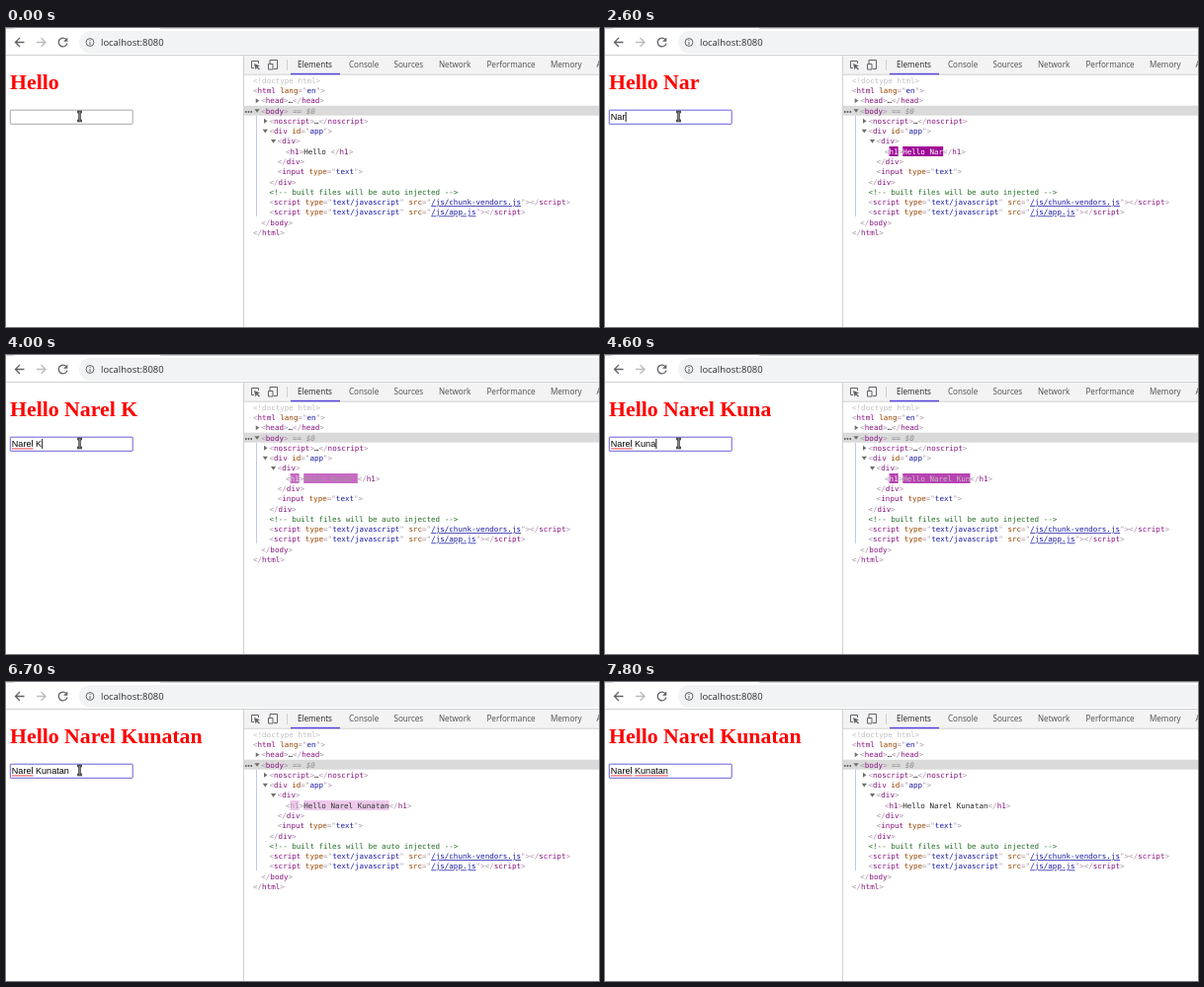
Write an HTML page that moves like this. It is 600 px wide and 303 px high and loops after 8 s.

```html
<!DOCTYPE html>
<html lang="en">
<head>
<meta charset="utf-8">
<title>Live heading</title>
<style>
html, body { margin: 0; width: 100%; height: 100%; overflow: hidden; background: #fff; }
svg { display: block; }
text { white-space: pre; }
.ui { font-family: "Open Sans", "Noto Sans", sans-serif; font-size: 8.1px; fill: #4a4d51; }
.code { font-family: "DejaVu Sans Mono", monospace; font-size: 7.56px; fill: #222; }
.p { fill: #a894a6; }
.t { fill: #881280; }
.a { fill: #994500; }
.v { fill: #1a1aa6; }
.u { text-decoration: underline; }
.c { fill: #236e25; }
.d { fill: #c0c0c0; }
.s { fill: #8a8a8a; font-style: italic; }
.line { fill: none; stroke: #5f6368; stroke-width: 1.3; }
</style>
</head>
<body>
<svg width="600" height="303" viewBox="0 0 600 303">
  <!-- browser bar -->
  <path d="M0 0H600V1H158Q156 1 155 0H9Q8 1 6 1H0Z" fill="#d0d3d8"/>
  <rect x="74" y="3" width="560" height="23" rx="11.5" fill="#f1f3f4"/>
  <path class="line" d="M18.5 14.5H9.5M14 10L9.5 14.5L14 19"/>
  <path class="line" style="stroke:#b9bbbe" d="M31 14.5H40M35.5 10L40 14.5L35.5 19"/>
  <path class="line" d="M61 11.6A4.4 4.4 0 1 0 61.9 15.6"/>
  <path d="M62.3 9.6V13.8H58.1Z" fill="#5f6368"/>
  <circle class="line" style="stroke-width:1" cx="85" cy="14.5" r="3.9"/>
  <path class="line" style="stroke-width:1" d="M85 14V17M85 12V13"/>
  <text class="ui" x="96" y="17.8" style="font-size:9.45px;fill:#2b2e32">localhost:8080</text>
  <path d="M0 27.5H600" stroke="#d0d0d0"/>

  <!-- page -->
  <text id="heading" x="4" y="62.2" fill="#f00" font-family="Liberation Serif, serif" font-weight="bold" font-size="21.8"></text>
  <rect id="box" x="4.3" y="83.2" width="123.9" height="14.1" rx=".5" fill="#fff"/>
  <text id="field" x="5.8" y="93.3" font-family="Liberation Sans, sans-serif" font-size="9.08"></text>
  <path id="errors" stroke="#e33" stroke-width=".9" fill="none"/>
  <rect id="caret" y="85" width=".9" height="10"/>
  <g id="pointer" fill="none">
    <path d="M72 85H77M72 94H77M74.5 85V94" stroke="#222" stroke-width="2.3"/>
    <path d="M72 85H77M72 94H77M74.5 85V94" stroke="#bbb" stroke-width=".6"/>
  </g>

  <!-- inspector -->
  <rect x="241" y="28" width="359" height="19" fill="#f3f3f3"/>
  <path d="M240.5 28V303M241 47.2H600M284.5 32V43" stroke="#d0d0d0"/>
  <path class="line" style="stroke-width:1" d="M251 40.5H248.5V33.5H255.5V36"/>
  <path d="M251 36L257 38.3L254.6 39.3L257 41.7L256 42.6L253.7 40.2L252.6 42.4Z" fill="#5f6368"/>
  <path class="line" style="stroke-width:1" d="M267 36V32.5H274.5V41.5H271M265.5 36.5H270V42H265.5Z"/>
  <rect x="288" y="45.8" width="50" height="1.5" fill="#5a48dc"/>
  <g id="tabs"></g>
  <rect x="241" y="78.7" width="359" height="10" fill="#dadada"/>
  <path d="M253.5 89V191" stroke="#bccbee"/>
  <g fill="#555"><circle cx="242.8" cy="85" r=".9"/><circle cx="245.5" cy="85" r=".9"/><circle cx="248.2" cy="85" r=".9"/></g>
  <g id="flash"><rect id="flashTag" y="120" height="10"/><rect id="flashText" y="120" height="10"/></g>
  <g id="tree"></g>
</svg>
<script>
const $ = id => document.getElementById(id);
const span = (kind, text) => `<tspan class="${kind}">${text}</tspan>`;
const attr = (name, value, link = '') =>
  ` ${span('a', name)}${span('p', '="')}${span('v ' + link, value)}${span('p', '"')}`;
const open = (name, attrs = '') => span('p', '&lt;') + span('t', name) + attrs + span('p', '&gt;');
const close = name => span('p', '&lt;/') + span('t', name) + span('p', '&gt;');
const script = src =>
  open('script', attr('type', 'text/javascript') + attr('src', src, 'u')) + close('script');

// Indent level, markup, and arrow: 1 closed, 2 open
const rows = [
  [0, span('d', '&lt;!doctype html&gt;')],
  [0, open('html', attr('lang', 'en'))],
  [1, open('head') + '…' + close('head'), 1],
  [1, open('body') + span('s', ' == $0'), 2],
  [2, open('noscript') + '…' + close('noscript'), 1],
  [2, open('div', attr('id', 'app')), 2],
  [3, open('div'), 2],
  [4, `${span('p', '&lt;')}<tspan id="liveTag" class="t">h1</tspan>${span('p', '&gt;')}<tspan id="liveText"></tspan>${close('h1')}`],
  [3, close('div')],
  [3, open('input', attr('type', 'text'))],
  [2, close('div')],
  [2, span('c', '&lt;!-- built files will be auto injected --&gt;')],
  [2, script('/js/chunk-vendors.js')],
  [2, script('/js/app.js')],
  [1, close('body')],
  [0, close('html')]
];
const arrows = ['', 'M-5.5 -5.2V-.2L-2 -2.7Z', 'M-6.8 -4.4H-1.6L-4.2 -.8Z'];
$('tree').innerHTML = rows.map(([level, markup, arrow = 0], i) =>
  `<g transform="translate(${250 + level * 8.25} ${55.8 + i * 10.28})">
   <path d="${arrows[arrow]}" fill="#6e6e6e"/><text class="code">${markup}</text></g>`).join('');

const tabs = { Elements: 295, Console: 347, Sources: 392.5, Network: 438, Performance: 486.5, Memory: 551, Application: 597.5 };
$('tabs').innerHTML = Object.entries(tabs).map(([name, x], i) =>
  `<text class="ui" x="${x}" y="40.3"${i ? '' : ' style="fill:#222"'}>${name}</text>`).join('');

const name = 'Narel Kunatan';
const keys = [1300, 1900, 2500, 3000, 3300, 3700, 4000, 4200, 4400, 4600, 5400, 5600, 5900];
const LOOP = 8000, STEP = 100, LAG = 100, CHAR = 4.551, LEAVE = 7500;
const FLASH = [160, 8, 152], PALE = [245, 219, 244], WHITE = [255, 255, 255];
const TAG = [136, 18, 128], BRACKET = [168, 148, 166], INK = [34, 34, 34];

const blend = (a, b, k) => a.map((v, i) => Math.round(v + (b[i] - v) * k));
const rgb = color => `rgb(${color})`;

// cubic-bezier(0, 0, .2, 1)
function ease(x) {
  if (x <= 0 || x >= 1) return x <= 0 ? 0 : 1;
  let s = Math.sqrt(x);
  for (let i = 0; i < 6; i++) s -= (.6 * s * s + .4 * s ** 3 - x) / (1.2 * s * (1 + s));
  return 3 * s * s - 2 * s ** 3;
}

const typedAt = t => keys.filter(k => k <= t).length;

function drawPage(t) {
  const count = typedAt(t), text = name.slice(0, count), field = $('field');
  $('heading').textContent = 'Hello ' + text;
  field.textContent = text;
  $('box').setAttribute('stroke', t < 100 ? '#a8a8a8' : '#6a5fd8');

  const width = n => n ? field.getSubStringLength(0, n) : 0;
  const last = count ? keys[count - 1] : 300;
  const lit = t >= 100 && Math.floor((t - last) / 500) % 2 !== 1;
  $('caret').setAttribute('x', 6 + width(count));
  $('caret').setAttribute('visibility', lit ? 'visible' : 'hidden');

  const gone = t >= LEAVE;
  let marks = count > 5 ? `M6 94.9H${5.8 + width(5)}` : '';
  if (gone) marks += `M${6 + width(6)} 94.9H${5.8 + width(13)}`;
  $('errors').setAttribute('d', marks);
  $('pointer').setAttribute('visibility', gone ? 'hidden' : 'visible');
}

function drawInspector(t) {
  const count = typedAt(t - LAG), text = 'Hello ' + name.slice(0, count);
  const age = count ? t - LAG - keys[count - 1] : 1400;
  const pale = ease(age / 1120), fade = ease((age - 1120) / 280);
  $('liveText').textContent = text;
  $('liveTag').style.fill = rgb(blend(blend(WHITE, BRACKET, pale), TAG, fade));
  $('liveText').style.fill = rgb(blend(WHITE, INK, pale));
  $('flash').setAttribute('fill', rgb(blend(FLASH, PALE, pale)));
  $('flash').setAttribute('opacity', 1 - fade);
  $('flashTag').setAttribute('x', 283 + CHAR);
  $('flashTag').setAttribute('width', 2 * CHAR);
  $('flashText').setAttribute('x', 283 + 4 * CHAR);
  $('flashText').setAttribute('width', text.length * CHAR);
}

const start = performance.now();
function frame() {
  const t = Math.floor((performance.now() - start) % LOOP / STEP) * STEP;
  drawPage(t);
  drawInspector(t);
  requestAnimationFrame(frame);
}
frame();
</script>
</body>
</html>
```
